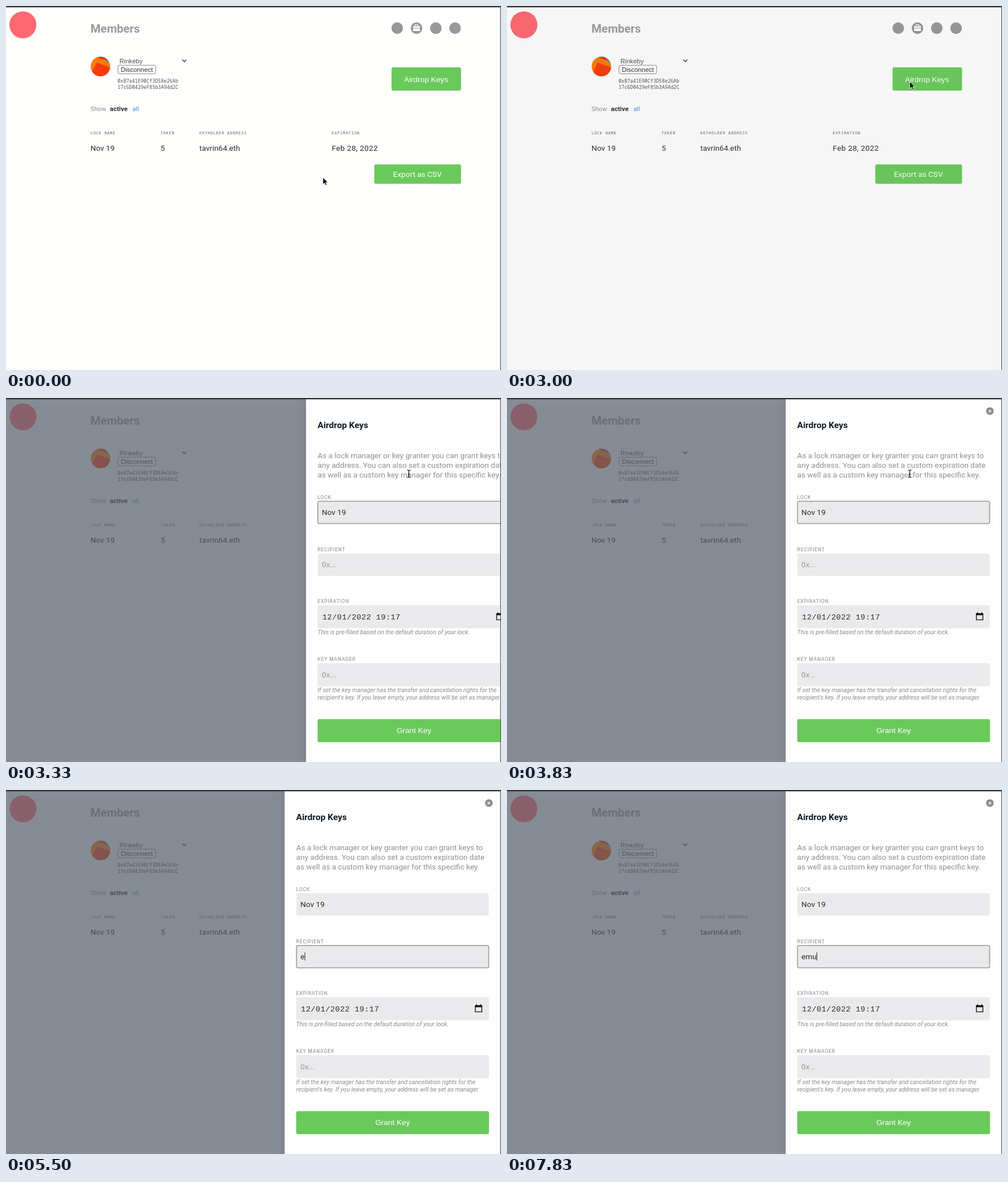
Animation, 873 px wide and 641 px high, one loop 8000 ms. Source, as an HTML page:

```html
<!DOCTYPE html>
<html lang="en">
<head>
<meta charset="utf-8">
<title>Airdrop keys</title>
<style>
  html, body { margin: 0; width: 100%; height: 100%; overflow: hidden; background: #fefefd; }
  svg { display: block; width: 100%; height: 100%; font: 13.6px Roboto, sans-serif; fill: #2c2c2c; }
  .arial { font-family: "Liberation Sans", sans-serif; }
  .mono { font-family: "Noto Sans Mono", monospace; }
  .small { font-size: 11.4px; }
  .white { fill: #fff; }
  .mid { text-anchor: middle; }
  .muted { fill: #989898; }
  .green { fill: #6ac95b; }
  .head { font-size: 6.8px; letter-spacing: .85px; fill: #5c5c5c; }
  .label { font-size: 8.5px; letter-spacing: .85px; fill: #858585; }
  .help { font-size: 10.65px; font-style: italic; fill: #8c8c8c; }
  .date { font-family: "Liberation Mono", monospace; letter-spacing: .45px; }
  .field { fill: #eaeaec; }
  .focus { stroke: #9b9b9d; stroke-width: 1.6; }
  .line { fill: none; stroke: #444; stroke-width: 1.6; }
</style>
</head>
<body>
<svg viewBox="0 0 873 641">
  <defs>
    <clipPath id="round"><circle cx="166.5" cy="106.5" r="17.2"/></clipPath>
    <linearGradient id="shade">
      <stop offset="0" stop-opacity="0"/>
      <stop offset="1" stop-opacity=".05"/>
    </linearGradient>
  </defs>
  <rect width="873" height="641" fill="#fefefd"/>

  <g id="page">
    <circle cx="29.8" cy="33.2" r="23.8" fill="#ff6771"/>
    <text x="149" y="47" font-size="20.4" font-weight="600" fill="#9a9a9a">Members</text>
    <g class="muted">
      <circle cx="690" cy="39" r="10.2"/>
      <circle cx="724" cy="39" r="10.2"/>
      <circle cx="758" cy="39" r="10.2"/>
      <circle cx="792" cy="39" r="10.2"/>
    </g>
    <path class="white" d="M718 35.5h12v3h-12zM718 39.5h12v4.5h-12z"/>
    <path d="M721.5 35v-1.8h5V35" fill="none" stroke="#fff" stroke-width="1.2"/>

    <g clip-path="url(#round)">
      <rect x="149" y="89" width="36" height="36" fill="#f97c0e"/>
      <path d="M159 88h20l6 14-12-9z" fill="#18a8c8"/>
      <path d="M161 91l10-2 9 8z" fill="#f5301a"/>
      <path d="M160 99.5l25 9.5v17h-36v-4z" fill="#f93a0b"/>
    </g>
    <text class="arial small" x="200" y="100.5" fill="#505050">Rinkeby</text>
    <path class="line" d="M311 94.5l3.5 3.5 3.5-3.5"/>
    <rect x="197.5" y="104.3" width="66.5" height="15" rx="2.5" fill="#fff" stroke="#858585"/>
    <text class="arial small" x="202.5" y="116">Disconnect</text>
    <g class="mono" font-size="8.5" fill="#505050">
      <text x="196.7" y="135.3">0xB7a41E90Cf3D58e26Ab</text>
      <text x="196.7" y="146.3">17c6D0429eF85b3A94d2C</text>
    </g>

    <g font-size="11.2">
      <text x="149" y="184.7" fill="#8c8c8c">Show</text>
      <text x="183.3" y="184.7" font-size="11.5" font-weight="700">active</text>
      <text x="223" y="184.7" fill="#4a90d9">all</text>
    </g>

    <g class="mono head">
      <text x="149" y="226.2">LOCK NAME</text>
      <text x="272.7" y="226.2">TOKEN</text>
      <text x="341" y="226.2">KEYHOLDER ADDRESS</text>
      <text x="574.5" y="226.2">EXPIRATION</text>
    </g>
    <text x="149" y="255.3">Nov 19</text>
    <text x="272.7" y="255.3">5</text>
    <text x="341" y="255.3">tavrin64.eth</text>
    <text x="574.5" y="255.3" letter-spacing=".33">Feb 28, 2022</text>

    <rect class="green" x="680" y="108" width="122.5" height="41" rx="3"/>
    <text class="arial white mid" x="740.8" y="133.5">Airdrop Keys</text>
    <rect class="green" x="649.5" y="279" width="153" height="34" rx="3"/>
    <text class="white mid" x="725.6" y="301">Export as CSV</text>
  </g>

  <rect id="overlay" width="873" height="641" fill="#545d69"/>

  <g id="panel">
    <rect x="477.5" width="14" height="641" fill="url(#shade)"/>
    <rect x="491.5" width="382" height="641" fill="#fefefe"/>
    <circle cx="851.6" cy="23" r="6.8" fill="#8c8c8c"/>
    <path d="M849.2 20.6l4.8 4.8m0-4.8l-4.8 4.8" stroke="#fff" stroke-width="1.2"/>
    <text x="511.8" y="52.7" font-size="15.5" font-weight="600" fill="#111827">Airdrop Keys</text>
    <g fill="#8f8f8f">
      <text x="511.8" y="106.2">As a lock manager or key granter you can grant keys to</text>
      <text x="511.8" y="123.2">any address. You can also set a custom expiration date</text>
      <text x="511.8" y="140.2">as well as a custom key manager for this specific key.</text>
    </g>
    <g class="label">
      <text x="511.8" y="177.6">LOCK</text>
      <text x="511.8" y="269.5">RECIPIENT</text>
      <text x="511.8" y="361.4">EXPIRATION</text>
      <text x="511.8" y="463.4">KEY MANAGER</text>
    </g>
    <g class="field">
      <rect id="lock" x="512.3" y="181.8" width="339" height="39.4" rx="3"/>
      <rect id="recipient" x="512.3" y="273.8" width="339" height="39.4" rx="3"/>
      <rect x="511.8" y="365" width="340" height="40.5" rx="3"/>
      <rect x="511.8" y="467" width="340" height="40.5" rx="3"/>
    </g>
    <text x="519.3" y="206">Nov 19</text>
    <text id="entry" x="519.3" y="297.8"></text>
    <rect id="caret" y="286.2" width="1" height="13.8" fill="#222"/>
    <text class="date" x="520.3" y="389.7">12/01/2022 19:17</text>
    <path d="M827 379h2.2v-1.8h1.5v1.8h5.6v-1.8h1.5v1.8h2.2v12.3h-13zM828.4 382.6v7.3h10.2v-7.3z" fill="#111" fill-rule="evenodd"/>
    <text x="519.3" y="491.7" fill="#999">0x...</text>
    <g class="help">
      <text x="511.8" y="415.7">This is pre-filled based on the default duration of your lock.</text>
      <text x="511.8" y="517.7">If set the key manager has the transfer and cancellation rights for the</text>
      <text x="511.8" y="531.2">recipient's key. If you leave empty, your address will be set as manager.</text>
    </g>
    <rect class="green" x="511.8" y="565.5" width="340" height="40.5" rx="3"/>
    <text class="arial white mid" x="681.8" y="590.4">Grant Key</text>
  </g>

  <path id="arrow" d="M0 0V12.2L2.8 9.6 4.6 13.7 6.7 12.8 4.9 8.8H8.7Z" fill="#000" stroke="#fff" stroke-width=".8"/>
  <path id="beam" d="M-3-6.5q3 0 3 1.5q0-1.5 3-1.5M0-5V5M-3 6.5q3 0 3-1.5q0 1.5 3 1.5M-1.5 1h3" fill="none" stroke="#111" stroke-width="1.2"/>
  <rect width="873" height="2.3" fill="#303036"/>
  <rect x="872" width="1" height="641" fill="#3c3c42"/>
</svg>

<script>
const LOOP = 8000, TICK = 500 / 3;
const el = Object.fromEntries([...document.querySelectorAll('[id]')].map(n => [n.id, n]));

// Each entry starts at the given tick; the screen is refreshed six times a second.
const typing = [[0, ''], [33, 'e'], [35, 'em'], [37, 'emu'], [39, 'emun'], [41, 'emu']];
const panelShift = [[0, 400], [19, 305], [20, 37.7], [21, 0]];
const dimming = [[0, 0], [18, .05], [19, .43], [20, .7]];
const pointer = [[0, 559, 302], [3, 559, 302], [11, 676, 128], [15, 710.4, 133.3],
                 [24, 710.4, 133.3], [29, 569, 294]];

const pick = (list, tick) => list.filter(([start]) => start <= tick).pop()[1];
const show = (node, on) => node.setAttribute('visibility', on ? 'visible' : 'hidden');

function pointerAt(tick) {
  const next = pointer.findIndex(([start]) => start > tick);
  if (next < 0) return pointer[pointer.length - 1].slice(1);
  const [t0, x0, y0] = pointer[next - 1], [t1, x1, y1] = pointer[next];
  const u = (tick - t0) / (t1 - t0), e = u * u * (3 - 2 * u);
  return [x0 + (x1 - x0) * e, y0 + (y1 - y0) * e];
}

function draw(tick) {
  el.panel.setAttribute('transform', `translate(${pick(panelShift, tick)} 0)`);
  el.overlay.setAttribute('opacity', pick(dimming, tick));

  const focused = tick >= 32, typed = pick(typing, tick);
  el.lock.classList.toggle('focus', !focused);
  el.recipient.classList.toggle('focus', focused);
  el.entry.textContent = typed || '0x...';
  el.entry.setAttribute('fill', typed ? '#2c2c2c' : '#999');
  el.caret.setAttribute('x', 519.4 + (typed ? el.entry.getComputedTextLength() : 0));
  show(el.caret, focused && !(tick >= 44 && tick < 47));

  const place = `translate(${pointerAt(tick).join(' ')})`;
  el.arrow.setAttribute('transform', place);
  el.beam.setAttribute('transform', place);
  show(el.arrow, tick < 20);
  show(el.beam, tick >= 20 && tick < 33);
}

const origin = performance.now();
function frame() {
  const time = (performance.now() - origin) % LOOP;
  draw(Math.floor((time + 4) / TICK) % 48);
  requestAnimationFrame(frame);
}
frame();
</script>
</body>
</html>
```
